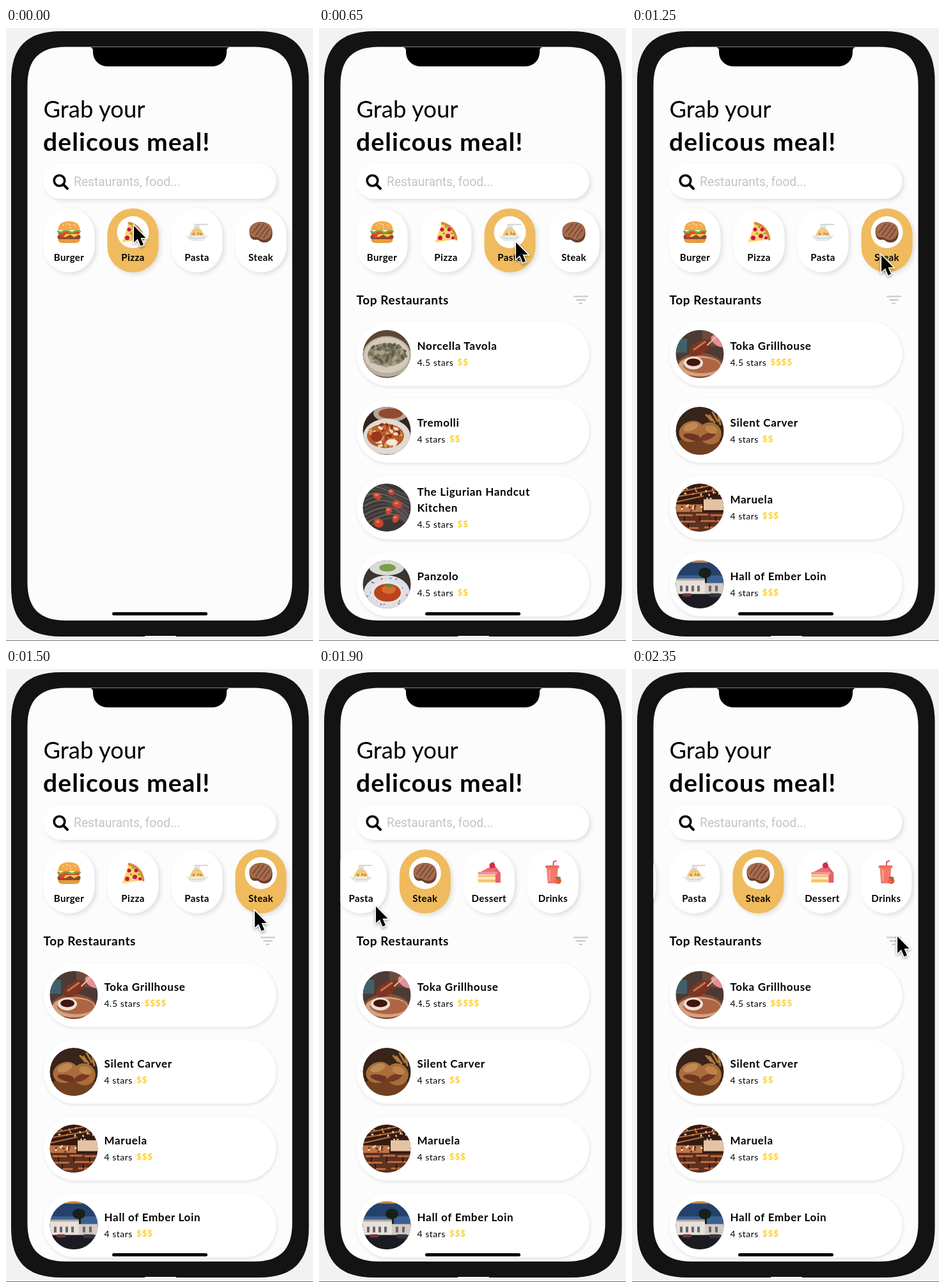
An HTML page for the animation above (2400 ms loop, 480 px wide and 958 px high).

```html
<!DOCTYPE html>
<html lang="en">
<head>
<meta charset="utf-8">
<title>Food finder</title>
<style>
  html, body { margin: 0; width: 100%; height: 100%; overflow: hidden; background: #f2f2f2; }
  svg { display: block; width: 100%; height: 100%; }
  text { font-family: Lato, sans-serif; }
  .title { font-size: 36.5px; }
  .strong { font-size: 39px; font-weight: 700; letter-spacing: 1.1px; }
  .hint { font: 19.3px Roboto, sans-serif; fill: #c4c4c6; }
  .label { font-size: 15px; font-weight: 700; letter-spacing: .4px; text-anchor: middle; }
  .head { font-size: 19px; font-weight: 700; letter-spacing: .6px; }
  .name { font-size: 17px; font-weight: 700; letter-spacing: .7px; }
  .stars { font-size: 14px; letter-spacing: .5px; }
  .price { fill: #fdd02f; font-weight: 700; }
  .card { fill: #fff; filter: drop-shadow(3px 3px 3px rgba(0, 0, 0, .11)); }
  .row { fill: #fff; filter: drop-shadow(1px 2px 2.5px rgba(0, 0, 0, .1)); }
  .cursor { filter: drop-shadow(0 2px 2px rgba(0, 0, 0, .35)); }
</style>
</head>
<body>
<svg viewBox="0 0 480 958">
  <defs>
    <clipPath id="screen"><path id="glass"/></clipPath>
    <clipPath id="round"><circle r="37.5"/></clipPath>
  </defs>
  <rect width="480" height="958" fill="#f2f2f2"/>
  <rect y="957" width="480" height="1" fill="#777"/>
  <path id="body" fill="#131313"/>
  <rect x="217" y="950" width="49" height="2" rx="1" fill="#fff"/>
  <g clip-path="url(#screen)">
    <rect x="33" y="29" width="415" height="898" fill="#fcfcfc"/>
    <text class="title" x="58.5" y="139.5">Grab your</text>
    <text class="strong" x="58" y="192">delicous meal!</text>
    <rect class="card" x="58.5" y="212" width="364" height="55" rx="27.5"/>
    <path d="M89.500 244.500L96 251" stroke="#000" stroke-width="4" stroke-linecap="round"/>
    <circle cx="83.500" cy="238.500" r="8.300" fill="none" stroke="#000" stroke-width="3.600"/>
    <text class="hint" x="106" y="247">Restaurants, food...</text>
    <g id="menu"></g>
    <g id="lists"></g>
  </g>
  <path d="M131 30A5 5 0 0 1 136 35V38A22 22 0 0 0 158 60H323A22 22 0 0 0 345 38V35A5 5 0 0 1 350 30Z"/>
  <rect x="166" y="913" width="149" height="5" rx="2.500"/>
  <path id="cursor" class="cursor" d="M0 0V26L6 20.500L10.500 31.500L15 29.500L10.500 19H18.500Z" stroke="#fff" stroke-width="3" paint-order="stroke"/>
</svg>
<script>
const $ = id => document.getElementById(id);
const oval = (fill, x, y, rx, ry = rx, turn = 0) =>
  `<ellipse cx="${x}" cy="${y}" rx="${rx}" ry="${ry}" fill="${fill}" transform="rotate(${turn} ${x} ${y})"/>`;
const box = (fill, x, y, w, h, r = 0) =>
  `<rect x="${x}" y="${y}" width="${w}" height="${h}" rx="${r}" fill="${fill}"/>`;
const shape = (fill, d) => `<path d="${d}" fill="${fill}"/>`;
const line = (color, width, d) =>
  `<path d="${d}" fill="none" stroke="${color}" stroke-width="${width}" stroke-linecap="round"/>`;

// Rounded rectangle with gradually tightening corners
function smoothRect(x, y, w, h, r) {
  const e = r * 1.2, c = r * .38, bend = (dx, dy, ex, ey) =>
    `c${dx * (e - c)} ${dy * (e - c)} ${dx * e + ex * c} ${dy * e + ey * c} ${(dx + ex) * e} ${(dy + ey) * e}`;
  return `M${x + e} ${y}h${w - 2 * e}${bend(1, 0, 0, 1)}v${h - 2 * e}${bend(0, 1, -1, 0)}` +
    `h${2 * e - w}${bend(-1, 0, 0, -1)}v${2 * e - h}${bend(0, -1, 1, 0)}Z`;
}
$('body').setAttribute('d', smoothRect(8, 5, 465.5, 946, 65));
$('glass').setAttribute('d', smoothRect(33.5, 29.5, 414, 896.5, 50));

let seed = 7;
const random = () => (seed = seed * 16807 % 2147483647) / 2147483647;
const scatter = (colors, count, x, y, rx, ry, size) => Array.from({ length: count }, (_, i) => {
  const angle = random() * 6.28, reach = Math.sqrt(random());
  return oval(colors[i % colors.length], x + rx * reach * Math.cos(angle),
    y + ry * reach * Math.sin(angle), size, size * .6, random() * 180);
}).join('');

const icons = {
  Burger:
    shape('#e89a3c', 'M-17 8H17V11Q17 17 9 17H-9Q-17 17 -17 11Z') +
    box('#8a4b32', -18, 4, 36, 7, 3.5) +
    shape('#ffc83d', 'M-17 3H17L8 8L2 4L-6 8Z') +
    box('#e8412f', -17, -1, 34, 4, 2) +
    line('#6fb23c', 3, 'M-17 -1Q-13 2 -9 -1T0 -1T9 -1T17 -1') +
    shape('#f5a94a', 'M-17 -3Q-17 -17 0 -17T17 -3Z') +
    scatter(['#fde0a8'], 9, 0, -10, 11, 4, 1.2) +
    shape('#e8412f', 'M-17 2L-4 2L-11 10Z'),
  Pizza:
    shape('#fdd368', 'M-17 16L-7 -13Q12 -8 16 11Z') +
    line('#d58a3c', 4, 'M-6 -14Q13 -9 16 11') +
    [[-6, -4, 3], [5, -4, 3], [-9, 9, 3.5], [3, 6, 3.5], [11, 9, 2.5]].map(p => oval('#c8174f', ...p)).join('') +
    [[0, -8], [-3, 2], [9, 2]].map(p => oval('#7aa52f', ...p, 2, 1.3, 30)).join(''),
  Pasta:
    shape('#f7d48a', 'M-12 6Q-9 -3 -3 -8H2Q9 -3 12 6Z') +
    line('#e5ae55', 1, 'M-9 4Q-5 -4 -1 -7M-5 5Q-2 -2 1 -7M0 5Q3 0 2 -5M9 4Q7 -1 4 -4') +
    line('#d6d6d6', 1.8, 'M-3 -5V-12M0 -5V-12M3 -5V-12M-3 -12H17') +
    oval('#ef7d4d', -5, 3, 2) + oval('#ef7d4d', 6, 3, 2) + oval('#78a844', 2, 2, 1.6) +
    shape('#e6eaeb', 'M-18 5Q0 9 18 5Q14 11 8 14H-8Q-14 11 -18 5Z') +
    line('#b9d6d6', 1.2, 'M-13 8Q0 12 13 8'),
  Steak:
    shape('#6b3f2e', 'M-18 -2C-18 -20 18 -22 18 0C19 14 10 17 3 16C-3 15 -3 11 -8 12C-16 13 -18 5 -18 -2Z') +
    shape('#a56c4c', 'M-17 -5C-15 -19 17 -20 17 -3C17 9 8 13 3 12C-3 11 -4 7 -9 8C-16 9 -18 1 -17 -5Z') +
    line('#704331', 1.4, 'M-13 1L-2 -13M-8 5L5 -13M-2 7L11 -10M4 9L14 -5'),
  Dessert:
    shape('#ee6b7a', 'M-17 0L8 -13L18 0Z') +
    box('#fbe8c0', -17, -1, 28, 16, 1) + box('#f5c468', -17, 3, 28, 3) + box('#f5c468', -17, 10, 28, 4) +
    shape('#e8606d', 'M8 -13L18 0V15H10V0Z') + box('#f5909a', -17, -2, 30, 4, 1) +
    oval('#d72b45', 5, -12, 4.5) + line('#793d34', 1, 'M5 -15L8 -18'),
  Drinks:
    line('#d9574f', 2, 'M0 -8L1 -18L5 -19') +
    shape('#f4796b', 'M-10 -9H8L6 16H-8Z') + box('#ee6a60', -12, -12, 22, 4, 2) +
    shape('#f9a296', 'M-7 -5H-4L-4 12H-6Z') +
    oval('#e65532', 8, 12, 5) + oval('#4f8b3c', 8, 7, 4, 1.5) + scatter(['#ffc38a'], 5, 8, 12, 4, 4, .7)
};

const pizzaPhoto = (table, cheese) => oval(table, 0, 0, 38) + oval('#b66b34', 0, 3, 32, 28) +
  oval(cheese, 0, 3, 27, 23) + scatter(['#b5321f', '#f3dfb2', '#58773a'], 21, 0, 3, 23, 19, 4.5);

// Each row: name lines, rating, price, photo
const lists = [
  [
    [['Crosta Vivelli'], '4.5', '$$', pizzaPhoto('#4d382c', '#dfa348')],
    [['Fornetto Blu'], '4', '$$', pizzaPhoto('#a58a70', '#d9793c')],
    [['Slicemoor'], '4.5', '$$', pizzaPhoto('#3c3634', '#e3b45c')],
    [['Tomasella'], '4', '$$', pizzaPhoto('#77513a', '#cf6a35')]
  ],
  [
    [['Norcella Tavola'], '4.5', '$$',
      oval('#5d4534', 0, 0, 38) + oval('#b9ada0', 0, 4, 38, 32) + oval('#d3c8b9', 0, 2, 35, 28) +
      oval('#8d866f', 0, 1, 30, 18) + scatter(['#5f5b48', '#aaa389', '#77705a'], 55, 0, 1, 29, 18, 4)],
    [['Tremolli'], '4', '$$',
      oval('#33231d', 0, 0, 38) + oval('#b9a496', 6, -27, 27, 13) + oval('#924a30', 6, -27, 19, 8) +
      oval('#e2dad2', 0, 9, 37, 28) + oval('#b65a2d', -2, 8, 29, 19) +
      scatter(['#d99a56', '#8f2f1a', '#f0dcc0', '#c4662f'], 40, -1, 8, 28, 18, 4) +
      oval('#9c351e', -16, 9, 9, 8) + oval('#f2e9dd', 8, 18, 9, 5)],
    [['The Ligurian Handcut', 'Kitchen'], '4.5', '$$',
      oval('#393635', 0, 0, 38) +
      Array.from({ length: 11 }, (_, i) => line(i % 2 ? '#64595a' : '#514946', 3,
        `M-34 ${i * 7 - 38}Q${i * 6 - 30} ${i * 4 - 45} 34 ${i * 6 - 18}`)).join('') +
      [[-15, -18, 7, 5], [16, -5, 8, 6], [-13, 24, 8, 7], [3, 5, 5, 6], [14, 17, 5, 7], [7, -24, 5, 4]]
        .map(p => oval('#c8452f', ...p, 25) + oval('#e8795a', p[0] - 1, p[1] - 2, 3, 2)).join('')],
    [['Panzolo'], '4.5', '$$',
      oval('#3b342f', 0, 0, 38) + oval('#d9dad7', 0, -26, 27, 12) + oval('#799f4a', 1, -26, 13, 6) +
      oval('#dce0e6', 0, 13, 36, 27) + scatter(['#b66565', '#6f83a5'], 24, 0, 13, 34, 25, 1.7) +
      oval('#e8e6e3', 0, 12, 25, 18) + oval('#b9441e', 1, 13, 21, 14) + oval('#d9692e', 3, 8, 11, 7) +
      oval('#608435', 4, 2, 6, 3)]
  ],
  [
    [['Toka Grillhouse'], '4.5', '$$$$',
      oval('#4b3b34', 0, 0, 38) + box('#42606b', -38, -24, 18, 22) + box('#6d4a3a', 4, -38, 34, 26) +
      oval('#8b4c34', 0, 23, 38, 25) + oval('#d5a280', 0, 19, 34, 16) + oval('#ad6543', 3, 18, 29, 12) +
      oval('#eee0d5', -10, 14, 15, 10) + oval('#42150e', -10, 13, 11, 6) +
      oval('#7d3422', 0, -10, 19, 10, -32) + line('#c07553', 3, 'M-9 -7L8 -19') +
      oval('#e88e98', 29, -20, 13, 7, 35) + line('#dec2a7', 2, 'M12 -14L34 -35')],
    [['Silent Carver'], '4', '$$',
      oval('#38241a', 0, 0, 38) + oval('#70401f', 0, 25, 38, 18) +
      line('#b07a3c', 3, 'M15 -24L23 -13M20 -29L28 -15M28 -29L32 -10M10 -25L18 -16') +
      oval('#a96d3a', -13, 1, 20, 16, -20) + oval('#6f3423', -10, 10, 16, 5, 12) +
      oval('#a96d3a', 16, 4, 18, 17, 22) + oval('#7a3826', 12, 9, 13, 5, -22) +
      oval('#c08b52', -14, -6, 12, 6, -20) + oval('#bd8449', 18, -2, 10, 6, 20)],
    [['Maruela'], '4', '$$$',
      oval('#321b13', 0, 0, 38) + line('#ba6c3a', 2, 'M-36 -17L34 -29M-30 -25L25 -36M-36 -9L5 -18') +
      scatter(['#ffd49a', '#e58f4b'], 16, 0, -23, 32, 11, 2) +
      box('#e4c3a4', 6, -13, 32, 17) + box('#bd7549', -38, -5, 42, 12) +
      scatter(['#ffe0b3', '#642f1c'], 14, -15, 0, 21, 5, 2) + box('#60301e', -38, 8, 76, 30) +
      line('#b86a40', 3, 'M-32 12H-12M-5 11H12M18 12H34M-32 22H-8M2 21H31M-24 32H-3M8 31H25') +
      line('#281510', 2, 'M-24 14V20M0 14V20M25 14V20M-18 25V31M15 25V31')],
    [['Hall of Ember Loin'], '4', '$$$',
      box('#23416b', -38, -38, 76, 76) + box('#c8893d', -38, -38, 76, 4) + box('#3a6091', -38, -14, 76, 18) +
      oval('#172019', 8, -18, 10, 8) + box('#172019', 7, -18, 4, 16) +
      box('#e7e0d8', -38, -8, 46, 25) + box('#d5cac2', 8, -2, 30, 19) + box('#b5aaa4', -38, -9, 46, 3) +
      [-31, -22, -13, -4, 14, 24].map(x => box('#6a6670', x, 2, 4, 9)).join('') +
      box('#1c1b21', -38, 15, 76, 24) + box('#74343a', -27, 14, 14, 5, 2) + box('#303644', 15, 14, 17, 6, 2)]
  ]
];

$('menu').innerHTML = Object.entries(icons).map(([label, icon], i) =>
  `<g transform="translate(${98.5 + i * 100} 319)"><rect class="card" x="-40" y="-37" width="80" height="100" rx="40"/>
  ${oval('#fff', 0, 0, 25)}${icon}<text class="label" y="45">${label}</text></g>`).join('');

const row = ([lines, rating, price, photo], i) => {
  const shift = (lines.length - 1) * 12.5;
  return `<g transform="translate(0 ${509.5 + i * 120})">
    <rect class="row" x="58.5" y="-50" width="364" height="100" rx="50"/>
    <g transform="translate(106 0)"><g clip-path="url(#round)">${photo}</g></g>
    ${lines.map((s, n) => `<text class="name" x="153.5" y="${-6.5 - shift + n * 25}">${s}</text>`).join('')}
    <text class="stars" x="153.5" y="${18.5 + shift}">${rating} stars<tspan class="price" dx="6" dy="-1">${price}</tspan></text>
  </g>`;
};
$('lists').innerHTML = lists.map(rows => `<g><text class="head" x="58.5" y="432">Top Restaurants</text>
  ${line('#c6c6c6', 2, 'M399 419.5H420M403 425H416M407 430.500H411')}${rows.map(row).join('')}</g>`).join('');

const cards = [...$('menu').children], panels = [...$('lists').children];
const clamp = v => Math.max(0, Math.min(1, v));
const path = [[0, 200, 309], [100, 200, 309], [250, 308, 335], [750, 308, 335], [870, 391, 332], [1150, 391, 332],
  [1350, 389, 378], [1550, 389, 378], [1850, 89, 371], [1950, 89, 371], [2300, 415, 418], [2400, 415, 418]];
const taps = [-150, 260, 870], dragStart = 1550, release = 1900, maxScroll = 201;

function cursorAt(t) {
  const i = path.findIndex(p => p[0] > t), [t0, x0, y0] = path[i - 1], [t1, x1, y1] = path[i];
  const u = (t - t0) / (t1 - t0), e = u * u * (3 - 2 * u);
  return [x0 + (x1 - x0) * e, y0 + (y1 - y0) * e];
}

function scrollAt(t) {
  if (t < dragStart) return 0;
  const drag = 389 - cursorAt(Math.min(t, release))[0];
  const excess = Math.max(0, drag - maxScroll) * .32;
  return Math.min(drag, maxScroll) + excess * Math.exp(-Math.max(0, t - release) / 80);
}

function draw(now) {
  const t = Math.floor(now % 2400 / 50) * 50;
  const active = taps.filter(tap => tap <= t).length - 1, age = t - taps[active];
  cards.forEach((card, i) => {
    const on = i === active + 1;
    card.style.opacity = on ? clamp(age / 150) : 1;
    card.firstChild.style.fill = on ? '#efbb5e' : '#fff';
  });
  panels.forEach((panel, i) => panel.style.opacity = i === active ? clamp((age - 150) / 110) : 0);
  $('menu').setAttribute('transform', `translate(${-scrollAt(t)} 0)`);
  $('cursor').setAttribute('transform', `translate(${cursorAt(t)})`);
  requestAnimationFrame(draw);
}
draw(0);
</script>
</body>
</html>
```
